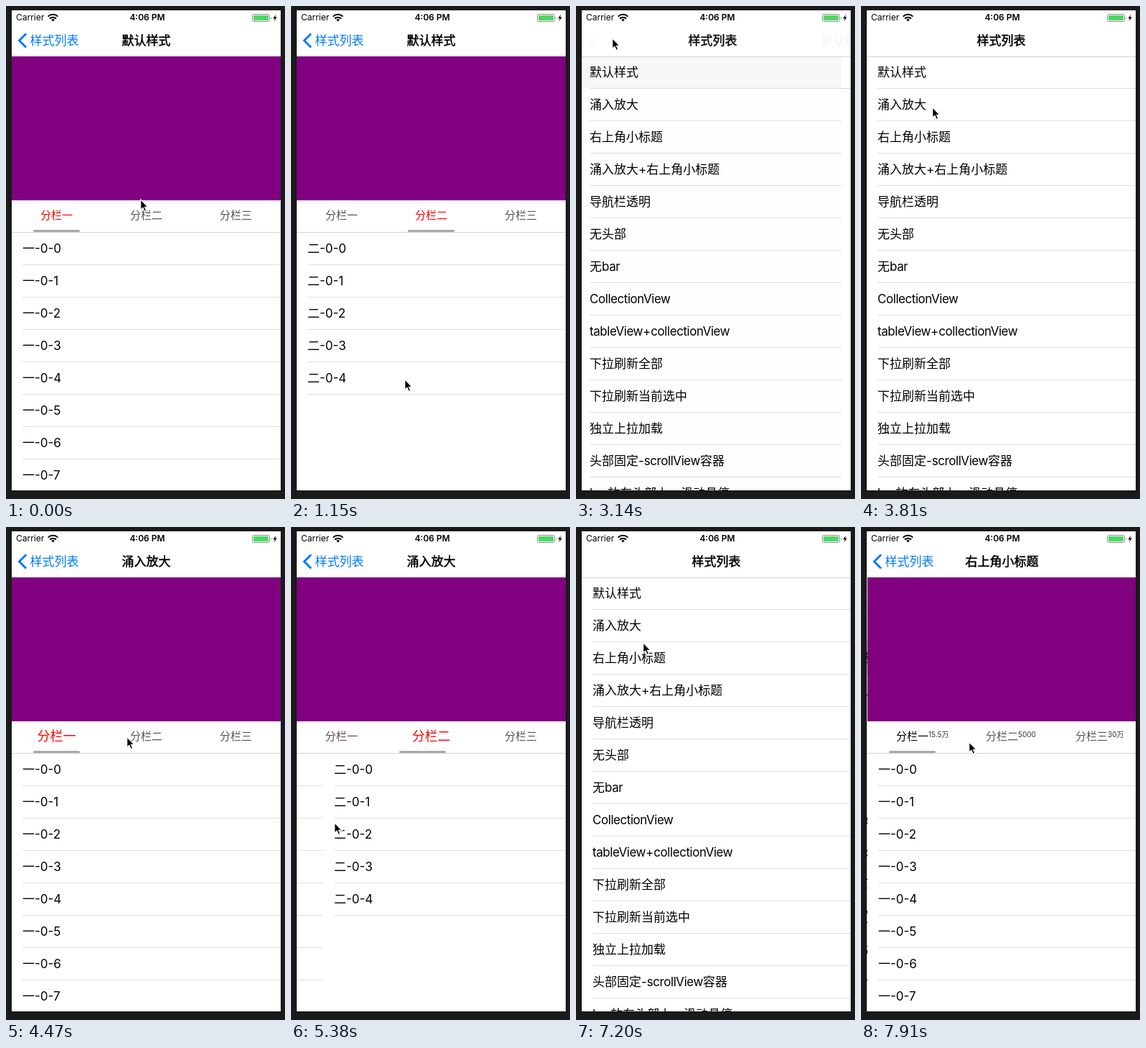
These frames come from a looping animation (389 by 685 pixels, 8 s). An HTML page:

```html
<!DOCTYPE html>
<html lang="zh-CN">
<head>
<meta charset="utf-8">
<style>
  html, body { margin: 0; width: 100%; height: 100%; overflow: hidden; background: #1a1a1a; }
  body { font: 17px/44px Inter, "Noto Sans CJK SC", "Noto Sans CJK", sans-serif; color: #000; }
  div, span, svg { position: absolute; white-space: nowrap; }
  i { font-style: normal; letter-spacing: -.45px; }
  #screen { left: 8px; top: 6px; width: 375px; height: 667px; overflow: hidden; background: #fff; }
  .view { left: 0; top: 64px; width: 375px; height: 603px; background: #fff; }
  .detail { overflow: hidden; }
  .hairline { top: 0; width: 375px; height: 1px; background: #d2d2d2; }
  #shade { inset: 0; background: #000; }
  .row { left: 0; width: 375px; height: 45px; }
  .row span { left: 15px; }
  .row::after { content: ""; position: absolute; left: 15px; right: 0; bottom: 0; height: 1px; background: #dfdfe1; }
  #mark { width: 375px; height: 44px; background: #d9d9d9; }
  .header { width: 375px; height: 200px; background: #800080; }
  .tabs { width: 375px; height: 44px; background: #fff; border-bottom: 1px solid #d2d2d2; }
  .tab { width: 125px; height: 42px; line-height: 42px; font-size: 15px; text-align: center; }
  .badge { left: 85px; top: -3px; font-size: 10px; color: #333; }
  .bar { left: 30px; top: 41px; width: 65px; height: 3px; border-radius: 1.5px; background: #a9a9a9; }
  .page { top: 245px; width: 375px; }
  #nav { width: 375px; height: 64px; background: #fff; }
  .title { top: 20px; width: 375px; text-align: center; -webkit-text-stroke: .5px; }
  #back { left: 25.5px; top: 20px; color: #007aff; }
  .status { font-size: 12px; line-height: 20px; }
  #art, #cursor { left: 0; top: 0; }
</style>
</head>
<body>
<div id="screen">
  <div class="view" id="list"><div id="mark"></div></div>
  <div id="shade"></div>
  <div id="nav">
    <span class="status" style="left:6px">Carrier</span>
    <span class="status" style="left:0;width:378px;text-align:center;font-weight:600">4:06 PM</span>
    <svg id="art" width="375" height="64" fill="none">
      <g stroke="#000" stroke-width="2">
        <path d="M50.6 8.6a10 10 0 0 1 13.8 0M53 11.5a6.4 6.4 0 0 1 9 0"/>
        <path d="M57.5 15.5l-2.3-2.4a3.3 3.3 0 0 1 4.6 0z" fill="#000" stroke="none"/>
      </g>
      <rect x="335.5" y="5.5" width="24" height="10" rx="2" stroke="#8a8a8a"/>
      <rect x="337" y="7" width="21" height="7" rx="1" fill="#4cd964"/>
      <path d="M361.2 8.5q1.6 2 0 4z" fill="#8a8a8a"/>
      <path d="M368.5 5.5l-4.2 5.7h2.6l-1.4 4.3 4.3-5.9h-2.7z" fill="#000"/>
      <path id="chevron" d="M20 32.5L10.5 42l9.5 9.5" stroke="#007aff" stroke-width="3"/>
    </svg>
    <span id="back">样式列表</span>
    <span class="title" id="listTitle">样式列表</span>
    <span class="title" id="detailTitle"></span>
  </div>
</div>
<svg id="cursor" width="16" height="22">
  <path d="M.7 .8v14.4l3.2-2.9 2.3 5.2 2.6-1.1-2.3-5.1h4.4z" fill="#000" stroke="#fff" stroke-width="1.2"/>
</svg>
<script>
const DURATION = 8000, WIDTH = 375, HEADER = 200;
const PUSH_TIME = 500, MS_PER_PIXEL = 1.8;
const $ = id => document.getElementById(id);

const menu = ['默认样式', '涌入放大', '右上角小标题', '涌入放大+右上角小标题', '导航栏透明', '无头部', '无bar',
  'CollectionView', 'tableView+collectionView', '下拉刷新全部', '下拉刷新当前选中', '独立上拉加载',
  '头部固定-scrollView容器', 'bar放在头部上，滑动悬停'];

const red = [255, 0, 0], black = [0, 0, 0];
const details = [
  { open: -PUSH_TIME, close: 2850, swipe: [360, 770], on: red },
  { open: 3930, close: 6470, swipe: [4640, 5720], on: red, zoom: .2 },
  { open: 7490, close: Infinity, on: black, badges: ['15.5万', '5000', '30万'] }
];

// Where the pointer arrives, and when
const rest = { at: 1150, x: 158, y: 518 }, release = 2385;
const stops = [
  { at: 0, x: 187, y: 268 }, { at: 340, x: 342, y: 328 }, { at: 520, x: 245, y: 316 }, rest,
  { at: 2110, x: 127, y: 145 }, { at: 2830, x: 50, y: 44 }, { at: 3760, x: 99, y: 140 },
  { at: 4460, x: 167, y: 290 }, { at: 4660, x: 310, y: 400 }, { at: 4890, x: 156, y: 402 },
  { at: 5380, x: 60, y: 410 }, { at: 6400, x: 50, y: 49 }, { at: 7260, x: 100, y: 178 }, { at: 7900, x: 150, y: 298 }
];

const ramp = (t, from, to) => Math.min(1, Math.max(0, (t - from) / (to - from)));
const smooth = x => x * x * (3 - 2 * x);
const easeOut = x => x * (2 - x);
const mix = (a, b, k) => a + (b - a) * k;

// Navigation curve, cubic-bezier(.36, .66, .04, 1)
function navEase(x) {
  const curve = (a, b, s) => 3 * (1 - s) ** 2 * s * a + 3 * (1 - s) * s * s * b + s ** 3;
  let lo = 0, hi = 1;
  for (let i = 0; i < 24; i++) {
    const mid = (lo + hi) / 2;
    if (curve(.36, .04, mid) < x) lo = mid; else hi = mid;
  }
  return curve(.66, 1, hi);
}

// The pointer waits, then travels for a time set by the distance
function pointer(t) {
  const next = stops.findIndex(stop => stop.at > t);
  if (next < 0) return stops[stops.length - 1];
  const a = stops[next - 1], b = stops[next];
  const travel = Math.min(b.at - a.at, Math.hypot(b.x - a.x, b.y - a.y) * MS_PER_PIXEL);
  const k = smooth(ramp(t, b.at - travel, b.at));
  return { x: mix(a.x, b.x, k), y: mix(a.y, b.y, k) };
}

// Content follows the drag, resists past the header and springs back on release
function scrollAt(t) {
  if (t < rest.at) return 0;
  const drag = rest.y - pointer(Math.min(t, release)).y;
  const spring = Math.exp(-Math.max(0, t - release) / 75);
  return Math.min(drag, HEADER) + Math.max(0, drag - HEADER) * .45 * spring;
}

function pushAt(t, { open, close }) {
  const slide = from => navEase(ramp(t, from, from + PUSH_TIME));
  return slide(open) - (t > close ? slide(close) : 0);
}

function add(parent, className, html = '') {
  const el = document.createElement('div');
  el.className = className;
  el.innerHTML = html;
  return parent.appendChild(el);
}

function addRows(parent, labels) {
  labels.forEach((label, i) => {
    const text = label.replace(/[A-Za-z]+/g, '<i>$&</i>');
    add(parent, 'row', `<span>${text}</span>`).style.top = i * 45 + 'px';
  });
}

const move = (el, x, y = 0) => el.style.transform = `translate(${Math.round(x)}px,${Math.round(y)}px)`;

function buildDetail(d) {
  d.view = add($('screen'), 'view detail');
  $('screen').insertBefore(d.view, $('nav'));
  d.pages = ['一', '二'].map((name, i) => {
    const page = add(d.view, 'page');
    addRows(page, Array.from({ length: i ? 5 : 9 }, (_, n) => `${name}-0-${n}`));
    return page;
  });
  d.tabs = add(d.view, 'tabs');
  d.labels = ['一', '二', '三'].map((name, i) => {
    const tab = add(d.tabs, 'tab', '分栏' + name);
    tab.style.left = i * 125 + 'px';
    if (d.badges) add(tab, 'badge', d.badges[i]);
    return tab;
  });
  d.bar = add(d.tabs, 'bar');
  add(d.view, 'hairline');
  d.header = add(d.view, 'header');
}

function drawDetail(d, t, push) {
  const page = d.swipe ? easeOut(ramp(t, ...d.swipe)) : 0;
  const scroll = d === details[0] ? scrollAt(t) : 0;
  move(d.view, (1 - push) * WIDTH);
  move(d.header, 0, -scroll);
  move(d.tabs, 0, Math.max(0, HEADER - scroll));
  move(d.bar, page * 125);
  d.pages.forEach((el, i) => move(el, (i - page) * WIDTH, -scroll));
  d.labels.forEach((tab, i) => {
    const on = Math.max(0, 1 - Math.abs(i - page));
    tab.style.color = `rgb(${d.on.map(c => Math.round(mix(85, c, on)))})`;
    if (d.zoom) tab.style.transform = `scale(${1 + d.zoom * on})`;
  });
}

function draw(t) {
  const current = details.findIndex(d => t < d.close + PUSH_TIME + 200);
  const push = pushAt(t, details[current]);
  details.forEach((d, i) => d.view.style.display = i === current ? '' : 'none');
  drawDetail(details[current], t, push);

  move($('list'), -.3 * WIDTH * push);
  $('shade').style.opacity = .1 * push;
  $('mark').style.top = current * 45 + 'px';
  $('mark').style.opacity = Math.min(1, push * 5);

  $('detailTitle').textContent = menu[current];
  $('detailTitle').style.opacity = push;
  move($('detailTitle'), (1 - push) * 187);
  $('listTitle').style.opacity = Math.max(0, 1 - 1.6 * push);
  move($('listTitle'), -128 * push);
  $('back').style.opacity = push;
  move($('back'), 128 * (1 - push));
  $('chevron').style.opacity = push;

  const { x, y } = pointer(t);
  move($('cursor'), x, y);
}

addRows($('list'), menu);
add($('list'), 'hairline');
details.forEach(buildDetail);

const start = performance.now();
function tick() {
  draw((performance.now() - start) % DURATION);
  requestAnimationFrame(tick);
}
tick();
</script>
</body>
</html>
```
